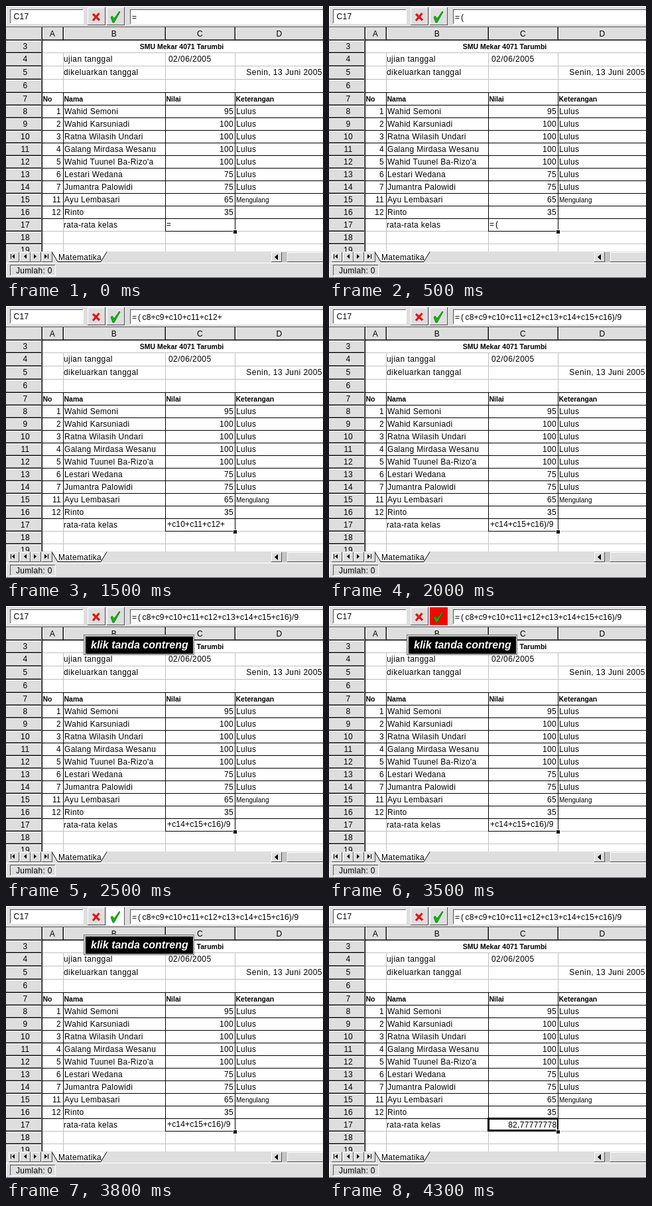
These frames come from a looping animation (478x410 px, 5.51 s). An HTML page:

```html
<!DOCTYPE html>
<html lang="id">
<head>
<meta charset="utf-8">
<style>
html, body { margin: 0; width: 100%; height: 100%; overflow: hidden; background: #dedede; }
svg { display: block; width: 478px; height: 410px; shape-rendering: crispEdges; }
text { font: 12px "Liberation Sans", Arial, sans-serif; letter-spacing: .3px; white-space: pre; }
.bold { font-weight: bold; font-size: 10.5px; letter-spacing: 0; }
.small { font-size: 10px; letter-spacing: 0; }
.wide { letter-spacing: .45px; }
.formula { letter-spacing: .16px; }
.tip { font: italic bold 16px "Liberation Sans", Arial, sans-serif; letter-spacing: 0; }
.smooth { shape-rendering: auto; }
</style>
</head>
<body>
<svg id="stage" viewBox="0 0 478 410"></svg>
<script>
const GRAY = '#dedede', GRID = '#c0c0c0', INK = '#000', SHADE = '#808080';
const LOOP = 5510;
const stage = document.getElementById('stage');

const rect = (x, y, w, h, fill, extra = '') =>
  `<rect x="${x}" y="${y}" width="${w}" height="${h}" fill="${fill}" ${extra}/>`;
const hline = (x1, x2, y, c = INK) => rect(x1, y, x2 - x1, 1, c);
const vline = (x, y1, y2, c = INK) => rect(x, y1, 1, y2 - y1, c);
const path = (d, extra) => `<path class="smooth" d="${d}" ${extra}/>`;
const text = (x, y, s, { at = 'start', cls = '', fill = INK } = {}) =>
  `<text x="${x}" y="${y}" text-anchor="${at}" class="${cls}" fill="${fill}">${s}</text>`;

// Bevelled box; swapping the edge colours turns it from raised to sunken.
const bevel = (x, y, w, h, fill, light, dark) =>
  rect(x, y, w, h, dark) + rect(x, y, w - 1, h - 1, light) + rect(x + 1, y + 1, w - 2, h - 2, fill);
const raised = (x, y, w, h, fill = GRAY) => bevel(x, y, w, h, fill, '#fff', '#555');
const sunken = (x, y, w, h, fill = '#fff') => bevel(x, y, w, h, fill, '#555', '#fff');
const framed = (x, y, w, h, line = INK, fill = '#fff') =>
  rect(x, y, w, h, line) + rect(x + 1, y + 1, w - 2, h - 2, fill);

const cols = [54, 86, 240, 345, 479];
const rowTop = r => r < 7 ? Math.floor(130 - (7 - r) * 19.75) : 130 + (r - 7) * 19;
const base = r => rowTop(r) + 14;

const pupils = [
  [1, 'Wahid Semoni', 95], [2, 'Wahid Karsuniadi', 100], [3, 'Ratna Wilasih Undari', 100],
  [4, 'Galang Mirdasa Wesanu', 100], [5, "Wahid Tuunel Ba-Rizo'a", 100], [6, 'Lestari Wedana', 75],
  [7, 'Jumantra Palowidi', 75], [11, 'Ayu Lembasari', 65], [12, 'Rinto', 35]
];

function sheet() {
  let s = rect(54, 52, 424, 318, '#fff');
  for (let r = 4; r <= 19; r++) s += hline(54, 478, rowTop(r), GRID);
  for (const x of cols.slice(1, 4)) s += vline(x, rowTop(4), 370, GRID);
  for (let r = 7; r <= 17; r++) s += hline(54, 478, rowTop(r));
  for (const x of cols.slice(0, 4)) s += vline(x, 130, 320);

  s += text(265, 65, 'SMU Mekar 4071 Tarumbi', { at: 'middle', cls: 'bold' });
  s += text(87, base(4), 'ujian tanggal', { cls: 'wide' });
  s += text(245, base(4), '02/06/2005', { cls: 'wide' });
  s += text(87, base(5), 'dikeluarkan tanggal', { cls: 'wide' });
  s += text(477, base(5), 'Senin, 13 Juni 2005', { at: 'end', cls: 'wide' });
  ['No', 'Nama', 'Nilai', 'Keterangan'].forEach((h, i) => {
    s += text(cols[i] + 1.5, base(7), h, { cls: 'bold' });
  });
  pupils.forEach(([no, name, mark], i) => {
    const y = base(8 + i);
    s += text(83, y, no, { at: 'end' }) + text(88, y, name) + text(343, y, mark, { at: 'end' });
    if (mark >= 75) s += text(347, y, 'Lulus');
    else if (mark > 60) s += text(347, y, 'Mengulang', { cls: 'small' });
  });
  return s + text(87, base(17), 'rata-rata kelas');
}

function headers() {
  let s = rect(0, 31, 478, 21, GRAY) + rect(0, 51, 54, 319, GRAY);
  s += hline(0, 478, 50, SHADE) + hline(0, 478, 51);
  cols.slice(0, 4).forEach((x, i) => {
    s += vline(x - 1, 32, 51, SHADE) + vline(x, 32, 51) + vline(x + 1, 32, 50, '#fff');
    s += text((x + cols[i + 1]) / 2, 46, 'ABCD'[i], { at: 'middle' });
  });
  for (let r = 3; r <= 19; r++) {
    const y = rowTop(r);
    s += hline(0, 54, y - 1, SHADE) + hline(0, 54, y) + hline(0, 53, y + 1, '#fff');
    s += text(29, base(r), r, { at: 'middle' });
  }
  return s + vline(53, 51, 370, SHADE) + vline(54, 51, 370);
}

function toolbar() {
  return raised(0, 0, 480, 32) +
    sunken(6, 5, 111, 22) + text(11.5, 20, 'C17') +
    raised(123, 2, 27, 27) + raised(152, 2, 27, 27) +
    rect(152, 2, 26, 27, '#f00', 'id="flash"') +
    path('M131 12L141 21.5M140.5 11L131 22', 'stroke="#e01818" stroke-width="3.2"') +
    path('M158 17l2-2 3 4 8-11 1 1-9 16h-2z', 'fill="#0b0" stroke="#060" stroke-width=".7"') +
    sunken(187, 5, 295, 23);
}

function footer() {
  let s = rect(0, 370, 478, 40, GRAY);
  const arrows = ['M13 374v7l-4-3.5zM7 374h1v7h-1z', 'M31 374v7l-4-3.5z', 'M42 374v7l4-3.5z', 'M58 374v7l4-3.5zM63 374h1v7h-1z'];
  arrows.forEach((d, i) => {
    s += raised(4 + Math.round(i * 16.5), 371, 16, 15) + path(d);
  });
  s += path('M69 370.5L78 385.5H143L152 370.5', 'fill="#fff" stroke="#000"');
  s += text(79, 383, 'Matematika');
  s += rect(400, 371, 78, 15, '#c4c4c4') + raised(400, 371, 16, 15) + raised(424, 371, 60, 15);
  s += path('M410 374v9l-5-4.5z');
  s += raised(0, 387, 480, 23);
  return s + sunken(6, 390, 69, 17, GRAY) + text(15, 403, 'Jumlah: 0');
}

const tip = rect(117, 43, 167, 31, '#777') + rect(118, 44, 165, 29, '#ccc') +
  rect(120, 46, 162, 26, INK) + text(128, 64, 'klik tanda contreng', { cls: 'tip', fill: '#fff' });

stage.innerHTML = sheet() + headers() + toolbar() + footer() +
  '<g id="bar"></g><g id="cell"></g>' +
  `<g id="tip">${tip}</g>`;

const full = '=(c8+c9+c10+c11+c12+c13+c14+c15+c16)/9';
const steps = [[0, 1], [500, 2], [1000, 14], [1500, 20], [2000, full.length]];

// The equals sign and bracket stand a little apart from the terms.
function formula(x, y, s) {
  const draw = (dx, part) => text(x + dx, y, part, { cls: 'formula' });
  return draw(0, s[0]) + draw(9, s.slice(1, 2)) + draw(15.5, s.slice(2));
}

function cellView(typed, done) {
  const y = 333;
  let s = framed(240, 320, 106, 20);
  if (done) {
    s = rect(239, 319, 107, 21, INK) + rect(242, 322, 102, 15, '#fff') +
      text(343.5, y + 1, '82,77777778', { at: 'end' });
  } else if (typed.length <= 14) {
    s += formula(242, y, typed);
  } else {
    const tail = typed.length === full.length ? 15 : 13;
    s += text(243, y, typed.slice(-tail), { cls: 'formula' });
  }
  return s + rect(342, 337, 7, 7, '#fff') + rect(343, 338, 5, 5, INK);
}

const part = id => document.getElementById(id);
const [bar, cell, tipBox, flash] = ['bar', 'cell', 'tip', 'flash'].map(part);
const show = (el, on) => el.setAttribute('visibility', on ? 'visible' : 'hidden');
let last = '';

function render(now) {
  const t = now % LOOP;
  const typed = full.slice(0, steps.filter(([at]) => t >= at).pop()[1]);
  const done = t >= 4300;
  if (last !== typed + done) {
    last = typed + done;
    bar.innerHTML = formula(190, 21, typed);
    cell.innerHTML = cellView(typed, done);
  }
  show(tipBox, t >= 2500 && !done);
  // The button blinks red and white, then rests on white until the result appears.
  const red = t < 3800 && Math.floor((t - 3500) / 100) % 2 === 0;
  show(flash, t >= 3500 && !done);
  flash.setAttribute('fill', red ? '#f00' : '#fff');
}

const start = performance.now();
function tick() {
  render(performance.now() - start);
  requestAnimationFrame(tick);
}
tick();
</script>
</body>
</html>
```
